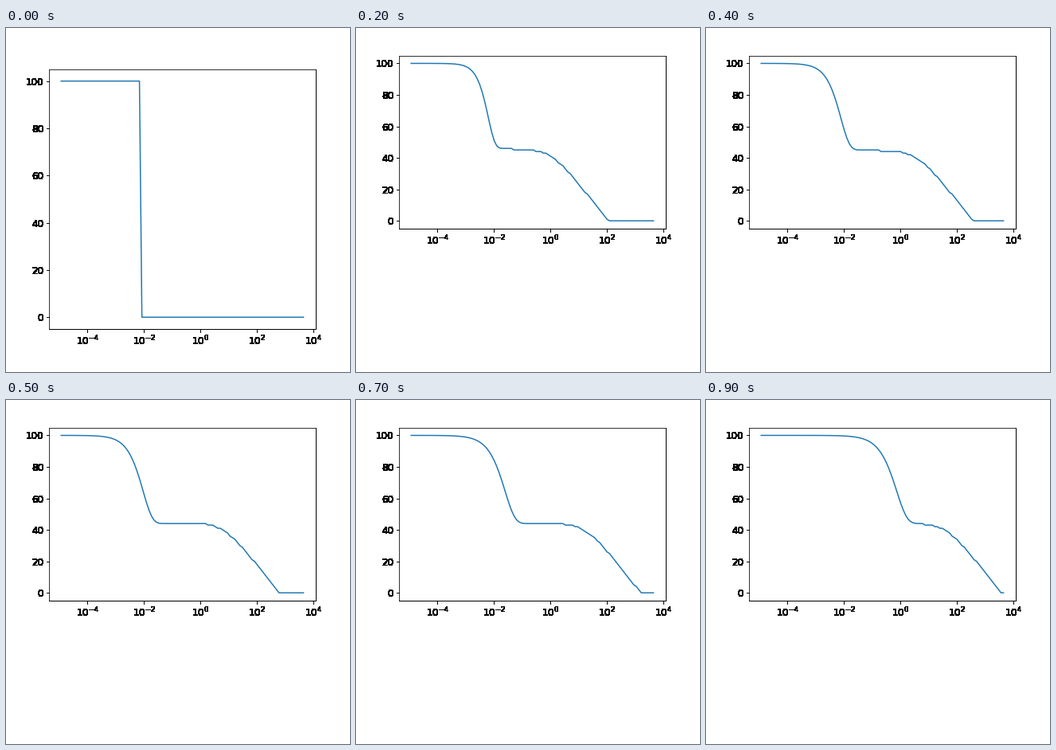
Write a matplotlib script that moves like this. It is 432 by 432 pixels and loops after 2.5 s.

```python
import numpy as np
import matplotlib.pyplot as plt
from matplotlib.animation import FuncAnimation
from matplotlib.ticker import NullLocator

plt.rcParams.update({"font.family": "DejaVu Sans", "font.size": 12,
                     "text.kerning_factor": 6})

STEP_MS = 100
STEPS = 25
LAST_MOVE = 9
LOG_X = np.linspace(-4.93, 3.65, 100)

TALL = [0.125, 0.125, 0.775, 0.755]
WIDE = [0.125, 180 / 432, 0.775, 0.755 * 288 / 432]

SLOPE = 22.5  # fall of the tail per decade
KNEE = 1.4    # sharpness of the bend into the tail


def curve(t):
    """Curve at step t: a first drop to a plateau, then a whole-number tail."""
    if t == 0:
        return np.where(LOG_X < -2.1, 100.0, 0.0)

    # Tail: flat, then straight in log x until it reaches zero.
    plateau = 43.6 + 4 / t
    end = 1.645 + 1.93 * ((t - 1) / (LAST_MOVE - 1)) ** 0.75
    bend = end - plateau / SLOPE
    fall = SLOPE / KNEE * np.log10(1 + 10 ** (KNEE * (LOG_X - bend)))
    tail = np.maximum(np.round(plateau - fall), 0)

    # First drop: stretched exponential, creeping and then rushing right.
    centre = -2.28 + 0.04 * t + 1.79 * (t / LAST_MOVE) ** 6
    power = 1 + 1.6 / t
    drop = np.exp(-10 ** (power * (LOG_X - centre)))
    return tail + (100 - np.round(plateau)) * drop


def harden(image, dpi):
    """Turn every touched pixel solid black, for heavy, jagged lettering."""
    out = np.zeros_like(image)
    out[..., 3] = image[..., 3] > 0
    return out, 0, 0


fig = plt.figure(figsize=(6, 6), dpi=72, facecolor="white")
ax = fig.add_axes(TALL)
ax.set_xscale("log")
line, = ax.plot(10 ** LOG_X, curve(0), color="#1f77b4", lw=1.5)

pad = (LOG_X[-1] - LOG_X[0]) / 20
ax.set_xlim(10 ** (LOG_X[0] - pad), 10 ** (LOG_X[-1] + pad))
ax.set_ylim(-5, 105)
ax.set_xticks([10.0 ** p for p in range(-4, 5, 2)])
ax.set_yticks(range(0, 101, 20))
ax.xaxis.set_minor_locator(NullLocator())
for part in (ax.xaxis, ax.yaxis, ax.spines["right"], ax.spines["bottom"]):
    part.set_agg_filter(harden)


def update(step):
    ax.set_position(TALL if step == 0 else WIDE)
    line.set_ydata(curve(min(step, LAST_MOVE)))
    return line,


anim = FuncAnimation(fig, update, frames=STEPS, interval=STEP_MS,
                     repeat=True, repeat_delay=0)
plt.show()
```
